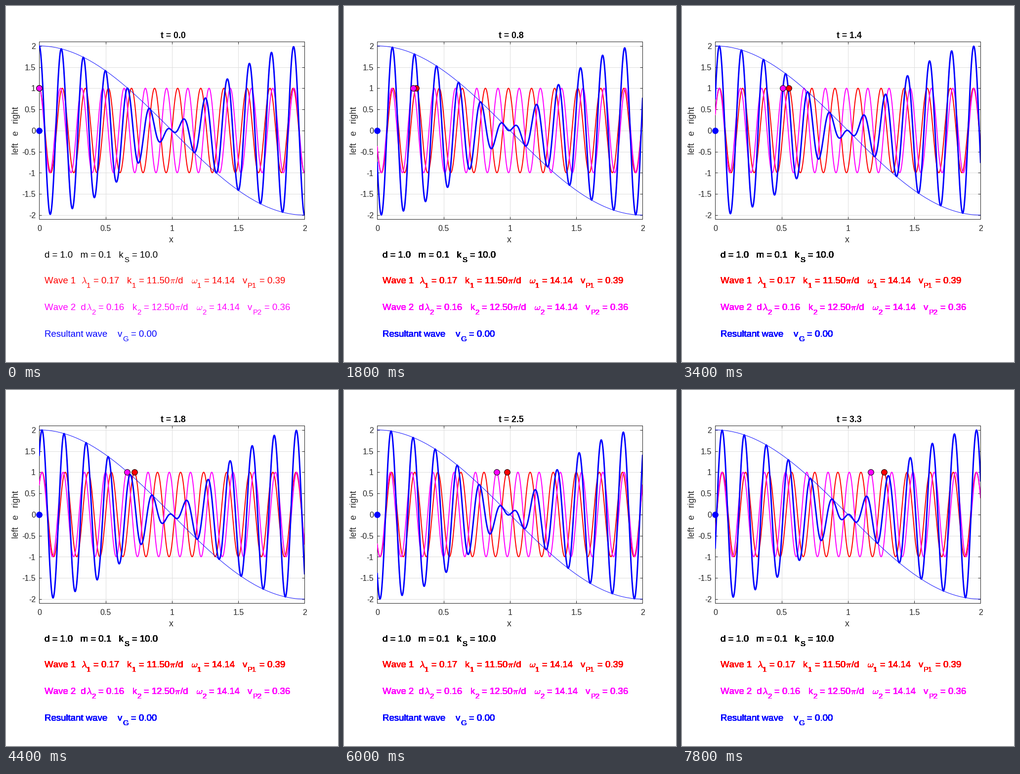
Animation of 672x720 px, one loop 8000 ms. Source, as a matplotlib script:

```python
import math

import matplotlib.pyplot as plt
import numpy as np
from matplotlib.animation import FuncAnimation

W, H, DPI = 672, 720, 96
FRAMES, INTERVAL = 40, 200
DT = 1 / 12                     # simulated seconds per frame
LAYERS = 14                     # text is repainted over itself, so its edges harden

plt.rcParams.update({
    "font.family": "Liberation Sans",
    "mathtext.fontset": "cm",
    "text.kerning_factor": 6,
})

INK = "#262626"
RED, MAGENTA, BLUE = "#ff0000", "#ff00ff", "#0000ff"

# chain of masses on springs
d, m, ks = 1.0, 0.1, 10.0
k1, k2 = 11.5 * math.pi / d, 12.5 * math.pi / d


def dispersion(k):
    return 2 * math.sqrt(ks / m) * abs(math.sin(k * d / 2))


w1, w2 = dispersion(k1), dispersion(k2)
v1, v2 = w1 / k1, w2 / k2
vg = (w2 - w1) / (k2 - k1)

fig = plt.figure(figsize=(W / DPI, H / DPI), dpi=DPI, facecolor="white")

LEFT, RIGHT, TOP, BOTTOM = 67.2, 604.4, 72.2, 431.4
ax = fig.add_axes([LEFT / W, 1 - BOTTOM / H, (RIGHT - LEFT) / W, (BOTTOM - TOP) / H])
ax.set(xlim=(0, 2), ylim=(-2.1, 2.1),
       xticks=np.arange(0, 2.1, 0.5), yticks=np.arange(-2, 2.1, 0.5))
ax.tick_params(direction="in", length=4, width=0.75, color=INK, top=True, right=True,
               labelbottom=False, labelleft=False)
ax.grid(color="#dedede", lw=0.75)
ax.set_axisbelow(True)
for side in ax.spines.values():
    side.set(linewidth=0.75, edgecolor=INK, zorder=1)


def put(x, y, s, size, color=INK, **kw):
    """Text with its baseline at pixel (x, y), y measured from the top."""
    kw.setdefault("va", "baseline")
    return fig.text(x / W, 1 - y / H, s, size=size, color=color, zorder=-1, **kw)


def to_px(x, y):
    return (LEFT + x * (RIGHT - LEFT) / 2,
            (TOP + BOTTOM) / 2 - y * (BOTTOM - TOP) / 4.2)


for x in ax.get_xticks():
    put(to_px(x, 0)[0] + 0.3, 455, f"{x:g}", 12, ha="center")
for y in ax.get_yticks():
    put(60, to_px(0, y)[1] + 6.2, f"{y:g}", 12, ha="right")

put(334, 478, "x", 13.2, ha="center")
put(25, 300.5, "left   e   right", 13.2, rotation=90, rotation_mode="anchor")
title = put(338, 65, "", 13.2, "black", weight="bold", ha="center")


def sub(x, y, s, color):
    return put(x, y + 9, s, 11.2, color)


def wave_note(n, y, shift, k, w, v, color):
    def at(x, s):
        return put(x + shift, y, s, 14, color)

    def low(x, s):
        return sub(x + shift, y, s, color)

    return [
        put(78, y, f"Wave {n}" + ("  d" if shift else ""), 14, color),
        at(152, r"$\lambda$"), low(163, f"{n}"), at(177, f"= {2 * math.pi / k:.2f}"),
        at(245, "k"), low(254.6, f"{n}"), at(268.6, f"= {k * d / math.pi:.2f}"),
        at(331, r"$\pi$"), at(343, "/d"),
        at(374.6, r"$\omega$"), low(387, f"{n}"), at(401, f"= {w:.2f}"),
        at(479, "v"), low(489, f"P{n}"), at(513, f"= {v:.2f}"),
    ]


def notes():
    y = 509
    first = [put(78, y, f"d = {d:.1f}   m = {m:.1f}   k", 14, "black"),
             sub(239, y, "S", "black"),
             put(255, y, f"= {ks:.1f}", 14, "black")]
    y = 669
    last = [put(78, y, "Resultant wave", 14, BLUE),
            put(226.4, y, "v", 14, BLUE),
            sub(235.8, y, "G", BLUE),
            put(253.3, y, f"= {abs(vg):.2f}", 14, BLUE)]
    return (first + wave_note(1, 561, 0, k1, w1, v1, RED)
            + wave_note(2, 615, 10.4, k2, w2, v2, MAGENTA) + last)


layers = [notes() for _ in range(LAYERS)]

xs = np.linspace(0, 2, 801)
line1, = ax.plot(xs, xs, color=RED, lw=1.5, zorder=3)
line2, = ax.plot(xs, xs, color=MAGENTA, lw=1.5, zorder=3.1)
total, = ax.plot(xs, xs, color=BLUE, lw=2.2, zorder=3.2)
ax.plot(xs, 2 * np.cos((k2 - k1) / 2 * xs), color=BLUE, lw=0.7, zorder=3.3)


def dot(y, face, edge, z):
    return ax.plot([0], [y], "o", ms=8.8, mfc=face, mec=edge, mew=0.75,
                   clip_on=False, zorder=z)[0]


dot1 = dot(1, RED, "black", 4)
dot2 = dot(1, MAGENTA, "black", 4.1)
dot_group = dot(0, BLUE, BLUE, 4.2)


def update(i):
    t = i * DT
    y1, y2 = np.cos(k1 * xs - w1 * t), np.cos(k2 * xs - w2 * t)
    line1.set_ydata(y1)
    line2.set_ydata(y2)
    total.set_ydata(y1 + y2)
    dot1.set_xdata([v1 * t])
    dot2.set_xdata([v2 * t])
    dot_group.set_xdata([vg * t])
    # halves round up
    title.set_text(f"t = {math.floor(t * 10 + 0.5 + 1e-9) / 10:.1f}")
    for n, layer in enumerate(layers):
        for text in layer:
            text.set_visible(n <= i)
    return []


anim = FuncAnimation(fig, update, frames=FRAMES, interval=INTERVAL,
                     init_func=lambda: update(0), repeat=True, repeat_delay=0)
plt.show()
```
